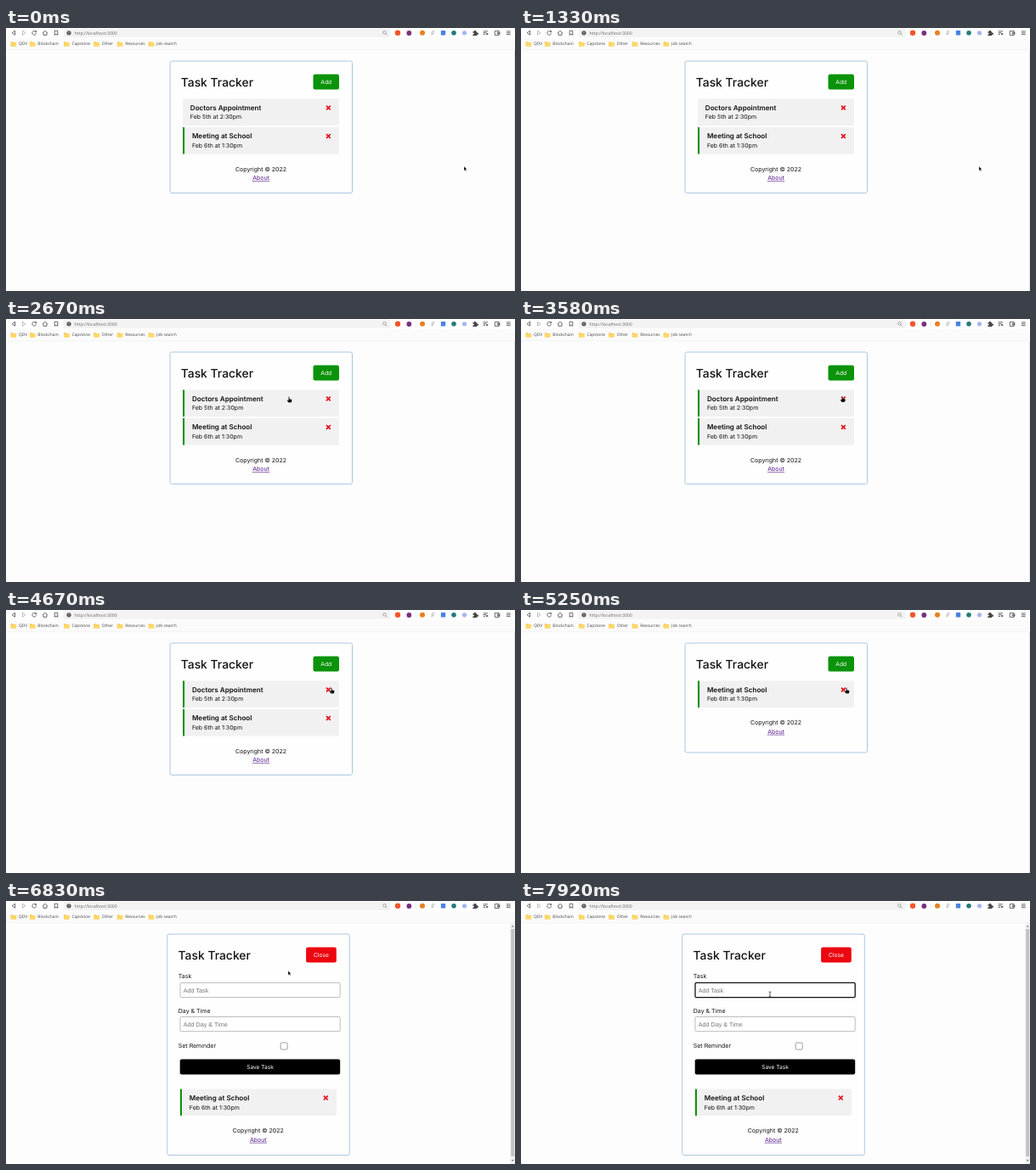
Write an HTML page that moves like this. It is 599 px wide and 310 px high and loops after 8000 ms.

```html
<!DOCTYPE html>
<html lang="en">
<head>
<meta charset="utf-8">
<title>Task Tracker</title>
<style>
  html, body { margin: 0; width: 100%; height: 100%; overflow: hidden; background: #fdfdfe; }
  svg { display: block; width: 599px; height: 310px; }
  text { font-family: Inter, "Open Sans", sans-serif; font-size: 7px; fill: #111; text-rendering: geometricPrecision; }
  .ui { font-family: "Open Sans", "Noto Sans", sans-serif; font-size: 4.9px; fill: #444; }
  .hint { font-family: "Liberation Sans", Arial, sans-serif; font-size: 7.2px; fill: #757575; }
  .mid { text-anchor: middle; }
</style>
</head>
<body>
<svg viewBox="0 0 599 310" xmlns="http://www.w3.org/2000/svg">
  <g id="bar"></g>
  <g id="page"></g>
  <g id="pointer"></g>
</svg>
<script>
const LOOP = 8000, STEP = 1000 / 12;
const REMIND = 2420, DELETE = 4910, OPEN = 6250, FOCUS = 7250, BLINK = 500;

// pointer hot spot: time, x, y
const PATH = [
  [0, 539, 163], [1330, 539, 163], [1920, 333, 91.5], [2990, 333, 91.5],
  [3500, 378, 91], [3830, 378, 91], [4330, 383, 91.5], [5420, 383, 91.5],
  [5920, 372.5, 66.5], [6600, 372.5, 66.5], [6830, 333, 81.5], [7090, 293, 110], [8000, 293, 110]
];

const $ = id => document.getElementById(id);
const rect = (x, y, w, h, fill, rest = '') =>
  `<rect x="${x}" y="${y}" width="${w}" height="${h}" fill="${fill}" ${rest}/>`;
const text = (x, y, s, rest = '') => `<text x="${x}" y="${y}" ${rest}>${s}</text>`;
const dot = (x, y, r, fill) => `<circle cx="${x}" cy="${y}" r="${r}" fill="${fill}"/>`;
const line = (d, color = '#444', w = 0.8) =>
  `<path d="${d}" fill="none" stroke="${color}" stroke-width="${w}"/>`;
const shape = (d, fill) => `<path d="${d}" fill="${fill}"/>`;

function folder(x, name) {
  return shape(`M${x} 16.2h2.4l.9 .8h3.2v4.4h-6.5z`, '#f3c64e') +
    rect(x, 17.6, 6.5, 3.8, '#ffd96b', 'rx=".4"') +
    text(x + 9.4, 20.3, name, 'class="ui"');
}

function browserBar() {
  const folders = [[5.6, 'QDV'], [27.9, 'Blockchain'], [68, 'Capstone'],
    [103.3, 'Other'], [130.8, 'Resources'], [167.7, 'Job search']];
  return rect(0, 0, 599, 12, '#fff') + rect(0, 12, 599, 14, '#fbfbfb') +
    rect(0, 25.6, 599, 0.6, '#ececec') + rect(67.5, 0.8, 385, 10.2, '#f3f3f4', 'rx="1"') +
    line('M10.6 3.2L7.2 5.7L10.6 8.2Z') + line('M19.6 3.2L23 5.7L19.6 8.2Z', '#aaa') +
    line('M35.2 4.3A2.4 2.4 0 1 0 35.6 6.3M35.6 3V4.8H33.7') +
    line('M43.2 5.8L46 3.3L48.8 5.8M44 5.4V8.3H48V5.4') +
    line('M57.2 3.2H60.8V8.4L59 7L57.2 8.4Z') +
    dot(74, 5.8, 2.6, '#555') + rect(73.7, 4.3, 0.6, 1.8, '#fff') + rect(73.7, 6.7, 0.6, 0.6, '#fff') +
    text(80.6, 7.6, 'http://localhost:3000', 'class="ui" style="font-size:5.2px;fill:#666"') +
    `<circle cx="445.4" cy="5.3" r="1.8" fill="none" stroke="#888" stroke-width=".7"/>` +
    line('M446.8 6.7L448.4 8.3', '#888') +
    dot(461, 5.8, 3.2, '#f2562b') + dot(474.3, 6, 2.9, '#7a2f7e') +
    rect(482, 2.5, 0.5, 7, '#ddd') +
    dot(490, 5.8, 3, '#e8801f') +
    line('M501 8.4L501.4 4.5L503 3L503.8 4.8L501.6 8', '#999', 0.7) +
    rect(511.8, 3.1, 5.4, 5.4, '#4a82e0', 'rx=".6"') +
    dot(527, 5.8, 2.8, '#247b78') + dot(539.5, 5.8, 2.6, '#a6b4ef') +
    shape('M549.3 4.2h1.6a1.1 1.1 0 1 1 2 0h1.4v1.6a1.1 1.1 0 1 1 0 1.8v1.3h-5v-1.5a1 1 0 1 0 0-1.7z', '#444') +
    line('M561.6 3.8H567M561.6 5.6H565M561.6 7.4H564', '#444', 0.8) + shape('M565.3 5.6l2.6 1.5l-2.6 1.5z', '#444') +
    line('M575.3 3.6H580.2V8.4H575.3ZM578.2 5.2H581V6.9H578.2Z', '#444', 0.8) +
    line('M588.9 3.9H593.7M588.9 5.8H593.7M588.9 7.7H593.7', '#444', 0.8) +
    folders.map(f => folder(...f)).join('');
}

function task(x, y, title, when, remind) {
  const left = x + (remind ? 10.9 : 8.8);
  return rect(x, y, 184, 31.5, '#f2f1f2') +
    (remind ? rect(x, y, 2.1, 31.5, '#0c930c') : '') +
    text(left, y + 13.2, title, 'style="font-size:8.1px;font-weight:600"') +
    text(left, y + 23.9, when) +
    line(`M${x + 169} ${y + 8.1}l4.8 4.8m0 -4.8l-4.8 4.8`, '#e3101a', 1.7);
}

function footer(x, y) {
  return text(x, y, 'Copyright © 2022', 'class="mid"') +
    text(x, y + 10.6, 'About', 'class="mid" style="fill:#551a8b"') +
    rect(x - 10.2, y + 11.6, 20.4, 0.6, '#551a8b');
}

function card(x, h, label, width, color) {
  return rect(x, 39, 214.5, h, '#fefefe', 'rx="2.2" stroke="#a4c1df" stroke-width=".9"') +
    text(x + 12.7, 69, 'Task Tracker', 'style="font-size:13.9px;font-weight:500"') +
    rect(x + 199 - width, 54.5, width, 18, color, 'rx="2.2"') +
    text(x + 199 - width / 2, 66.2, label, 'class="mid" style="font-size:6.7px;fill:#fff"');
}

function field(y, hint, focus) {
  const edge = focus ? 'stroke="#111" stroke-width="1.3"' : 'stroke="#b5b5b5" stroke-width=".9"';
  return rect(205, y, 188.2, 17.2, '#fff', `rx="1.3" ${edge}`) +
    text(208.8, y + 11.2, hint, 'class="hint"');
}

const meeting = (x, y) => task(x, y, 'Meeting at School', 'Feb 6th at 1:30pm', true);

function listView(remind, deleted) {
  const tasks = deleted ? meeting(208, 83.5) :
    task(208, 83.5, 'Doctors Appointment', 'Feb 5th at 2:30pm', remind) + meeting(208, 117);
  return rect(598, 26, 1, 284, '#e4e4e6') +
    card(193, deleted ? 129 : 155.5, 'Add', 30.5, '#0b930b') +
    tasks + footer(300, deleted ? 135.2 : 168.7);
}

function formView(focus, caret) {
  return rect(593.4, 26, 5.6, 284, '#f1f1f2') + rect(594.2, 33, 4, 268, '#c2c2c4') +
    shape('M594.8 30.6l1.4-1.8l1.4 1.8z', '#666') + shape('M594.8 305l1.4 1.8l1.4-1.8z', '#666') +
    card(189.8, 260.6, 'Close', 35.7, '#ec0710') +
    text(202.8, 91.4, 'Task') + field(96.4, 'Add Task', focus) +
    (caret ? rect(208.4, 100.6, 0.6, 8.4, '#111') : '') +
    text(202.8, 131.7, 'Day &amp; Time') + field(136.5, 'Add Day &amp; Time') +
    text(202.8, 173.3, 'Set Reminder') +
    rect(323.2, 167, 8, 8, '#fff', 'rx="1.1" stroke="#888" stroke-width=".8"') +
    rect(204.7, 186.4, 188.5, 18, '#000', 'rx="2.2"') +
    text(299, 197.8, 'Save Task', 'class="mid" style="font-size:6.6px;fill:#fff"') +
    meeting(204.9, 221.6) + footer(296.8, 273.2);
}

const POINTERS = {
  arrow: `<path d="M0 0V5.2L1.2 4.1L2 5.9L2.8 5.5L2 3.8H3.5Z" fill="#000" stroke="#fff" stroke-width=".3"/>`,
  hand: `<path d="M-.6 .4Q0 -.4 .6 .4V2.7L3 3.3Q3.7 3.6 3.5 4.5L2.8 7H-.6L-2.3 4.5Q-2.2 3.7 -1.4 4L-.6 4.6Z" fill="#000" stroke="#fff" stroke-width=".25"/>`,
  beam: line('M-1.3 -3Q0 -3 0 -2.3Q0 -3 1.3 -3M0 -2.5V2.5M-1.3 3Q0 3 0 2.3Q0 3 1.3 3', '#111', 0.7)
};

function place(t) {
  const i = PATH.findIndex(p => p[0] > t);
  const [t0, x0, y0] = PATH[i - 1], [t1, x1, y1] = PATH[i];
  const k = (t - t0) / (t1 - t0), e = k * k * (3 - 2 * k);
  // the approach to the form field passes its midpoint without stopping
  const u = t0 >= 6600 && t0 < 7090 ? k : e;
  return [x0 + (x1 - x0) * u, y0 + (y1 - y0) * u];
}

function kind(x, y, t) {
  const over = (a, b, c, d) => x > a && x < c && y > b && y < d;
  if (t >= OPEN) {
    if (over(353, 54, 389, 73)) return 'hand';
    return over(205, 96, 393, 114) ? 'beam' : 'arrow';
  }
  const tasks = over(208, 83, 392, 115) || (t < DELETE && over(208, 117, 392, 149));
  return tasks || over(361, 54, 392, 73) ? 'hand' : 'arrow';
}

let shown = '';
function draw(now) {
  const raw = now % LOOP;
  const t = Math.min(Math.floor((raw + 5) / STEP) * STEP + 3, LOOP - 1);
  const focus = t >= FOCUS, caret = focus && Math.floor((t - FOCUS) / BLINK) % 2 === 0;
  const state = [t >= OPEN, t >= REMIND, t >= DELETE, focus, caret].join();
  if (state !== shown) {
    $('page').innerHTML = t >= OPEN ? formView(focus, caret) : listView(t >= REMIND, t >= DELETE);
    shown = state;
  }
  const [x, y] = place(t);
  $('pointer').innerHTML = POINTERS[kind(x, y, t)];
  $('pointer').setAttribute('transform', `translate(${x.toFixed(2)} ${y.toFixed(2)})`);
}

$('bar').innerHTML = browserBar();
const start = performance.now();
function tick() {
  draw(performance.now() - start);
  requestAnimationFrame(tick);
}
tick();
</script>
</body>
</html>
```
